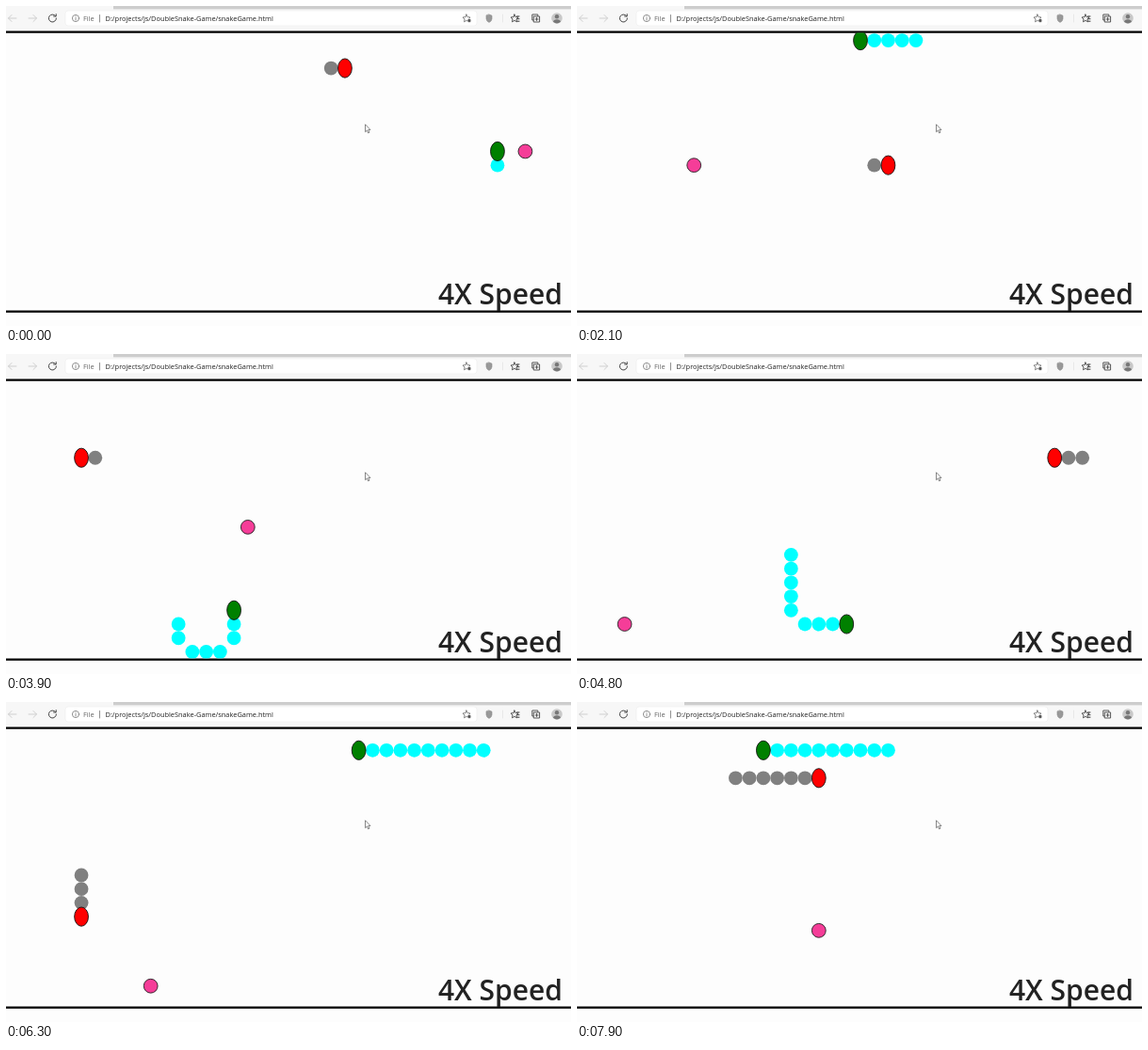
Animation of 600 by 340 pixels, one loop 8000 ms. Source, as an HTML page:

```html
<!DOCTYPE html>
<html lang="en">
<head>
<meta charset="utf-8">
<title>Double Snake</title>
<style>
  html, body { margin: 0; width: 100%; height: 100%; overflow: hidden; background: #fdfdfd; }
  svg { display: block; }
  text { font-family: "Open Sans", "Noto Sans", sans-serif; }
  .icon { fill: none; stroke: #444; stroke-width: 1; stroke-linecap: round; stroke-linejoin: round; }
  .off { stroke: #cfcfcf; }
  .url { font-size: 7.42px; fill: #222; }
</style>
</head>
<body>
<svg width="600" height="340" viewBox="0 0 600 340">
  <defs>
    <clipPath id="field"><rect y="28.5" width="600" height="295"/></clipPath>
    <path id="star" d="M0 -4 L1.2 -1.3 L4 -1 L2 1 L2.5 3.8 L0 2.4 L-2.5 3.8 L-2 1 L-4 -1 L-1.2 -1.3 Z"/>
  </defs>

  <!-- browser bar -->
  <rect width="600" height="26" fill="#f7f7f7"/>
  <rect x="114" width="486" height="3.4" fill="#cdcdcd"/>
  <rect x="63" y="5" width="437" height="16" rx="3" fill="#fff" stroke="#ececec" stroke-width=".6"/>
  <g class="icon">
    <path class="off" d="M11 13 H2.5 M6 9.5 L2.5 13 L6 16.5"/>
    <path class="off" d="M24 13 H32.5 M29 9.5 L32.5 13 L29 16.5"/>
    <path d="M52.6 10.6 A4 4 0 1 0 53.4 13 M53.2 8.6 V11 H50.6"/>
    <g stroke="#777" stroke-width=".8">
      <circle cx="74" cy="13" r="3.6"/>
      <path d="M74 12.6 V15 M74 11 V11.2"/>
      <path d="M99.5 9.5 V17"/>
    </g>
    <use href="#star" x="489" y="13" stroke="#666" stroke-width=".8"/>
    <circle cx="492" cy="15.5" r="2.1" fill="#555" stroke="#fff" stroke-width=".6"/>
    <path d="M513 9 L516 10.2 V13.5 Q516 16 513 17.4 Q510 16 510 13.5 V10.2 Z" fill="#999" stroke="#888" stroke-width=".6"/>
    <path d="M527.5 9 V17" stroke="#ddd" stroke-width=".6"/>
    <use href="#star" x="540" y="13" stroke-width=".9"/>
    <path d="M542.5 11 H545 M543 13.7 H545 M543 16.2 H545" stroke="#333"/>
    <path d="M560 15 H558.8 V9 H564.8 V10.4 M560.6 11 H566.6 V17 H560.6 Z M563.6 12.5 V15.5 M562.1 14 H565.1" stroke-width=".9"/>
  </g>
  <circle cx="585" cy="13" r="5.8" fill="#c9c9c9"/>
  <circle cx="585" cy="11.3" r="2.2" fill="#777"/>
  <path d="M581 16.8 Q581.5 14.2 585 14.2 Q588.5 14.2 589 16.8 Q585 20 581 16.8" fill="#777"/>
  <text class="url" x="82" y="15.8" style="fill:#666">File</text>
  <text class="url" x="105.5" y="15.8">D:/projects/js/DoubleSnake-Game/snakeGame.html</text>

  <!-- playing field -->
  <path d="M0 27.6 H600 M0 324.6 H600" stroke="#000" stroke-width="2.4"/>
  <g id="game" clip-path="url(#field)"></g>

  <text x="591" y="316.5" text-anchor="end" font-size="30" font-weight="600" fill="#222">4X Speed</text>
  <path d="M381.5 125.8 V133.8 L383.3 132.2 L384.6 135 L385.9 134.4 L384.7 131.6 H387 Z" fill="#fff" stroke="#555" stroke-width=".7"/>
</svg>

<script>
const COLS = 42, ROWS = 20, CELL = 14.73, TICK = 100, LOOP = 8000;
const KEYS = [0, 14, 28, 39, 57, 69, 79];   // ticks at which each leg starts
const STEP = { U: [0, -1], D: [0, 1], L: [-1, 0], R: [1, 0] };
const mod = (n, m) => ((n % m) + m) % m;

// A leg is a list of runs such as "R20". The first step after a turn is diagonal.
function makeSnake(head, dir, legs, skin, bodyColor) {
  let [c, r] = head;
  const [sx, sy] = STEP[dir];
  const path = [[c - sx, r - sy], [c, r]];
  const marks = [1];
  for (const leg of legs) {
    for (const run of leg.split(" ")) {
      const next = run[0];
      for (let n = +run.slice(1); n > 0; n--) {
        if (next !== dir) { c += STEP[dir][0]; r += STEP[dir][1]; }
        c += STEP[next][0];
        r += STEP[next][1];
        dir = next;
        path.push([mod(c, COLS), mod(r, ROWS)]);
      }
    }
    marks.push(path.length - 1);
  }
  const at = tick => {
    let i = KEYS.length - 2;
    while (i > 0 && tick < KEYS[i]) i--;
    const p = Math.min(1, (tick - KEYS[i]) / (KEYS[i + 1] - KEYS[i]));
    return Math.floor(marks[i] + p * (marks[i + 1] - marks[i]) + 1e-6);
  };
  return { path, at, skin, bodyColor, meals: [] };
}

const green = makeSnake([35, 8], "U", [
  "R1 D6 R20 U8 R16 D7 R16 U10 L2",
  "U1 L10 D8 L6 U8 L16 D8 L6 U8 L14",
  "L8 D7 L24 D3 R12 D6 R3 U3",
  "U5 R40 D6 R51 D3 L6",
  "L72",
  "L60"
], "#008000", "#00ffff");

const red = makeSnake([24, 2], "R", [
  "R86",
  "R30 D6 R50",
  "R22 U3 L41",
  "L60 U2 L35 D14",
  "R1 U14 R10 D15 R13 U10 R10",
  "D8 L26 U12 R14"
], "#ff0000", "#808080");

// column, row and the snake that eats it
const foods = [
  [37, 8, green], [39, 13, green], [5, 1, green], [8, 9, green],
  [24, 6, green], [12, 18, green], [17, 10, green], [30, 5, red],
  [3, 17, green], [36, 15, red], [10, 18, red], [29, 16, red],
  [3, 9, red], [17, 14, null]
].map(([c, r, eater]) => ({ c, r, eater, gone: Infinity }));

let born = 0;
for (const food of foods) {
  const s = food.eater;
  if (!s) break;
  const from = s.at(born);
  const hit = s.path.findIndex(([c, r], i) => i > from && c === food.c && r === food.r);
  while (s.at(born) < hit) born++;
  food.gone = born;
  s.meals.push(born);
}

const shape = (c, r, ry, fill, stroke) =>
  `<ellipse cx="${(6.4 + c * CELL).toFixed(2)}" cy="${(36.6 + r * CELL).toFixed(2)}" ` +
  `rx="7.4" ry="${ry}" fill="${fill}" stroke="${stroke}" stroke-width=".9"/>`;

function snakeMarkup(s, tick) {
  const i = s.at(tick);
  const size = 1 + s.meals.filter(m => m <= tick).length;
  const body = s.path.slice(i - size, i).map(([c, r]) => shape(c, r, 7.4, s.bodyColor, "none"));
  return body.join("") + shape(...s.path[i], 10.1, s.skin, "#111");
}

const game = document.getElementById("game");
let shown = -1;

function draw(now) {
  const tick = Math.floor((now % LOOP) / TICK);
  if (tick !== shown) {
    shown = tick;
    const food = foods.find(f => tick < f.gone);
    game.innerHTML = shape(food.c, food.r, 7.4, "#f53d98", "#222") +
      snakeMarkup(green, tick) + snakeMarkup(red, tick);
  }
}

const start = performance.now();
function loop() {
  draw(performance.now() - start);
  requestAnimationFrame(loop);
}
loop();
</script>
</body>
</html>
```
